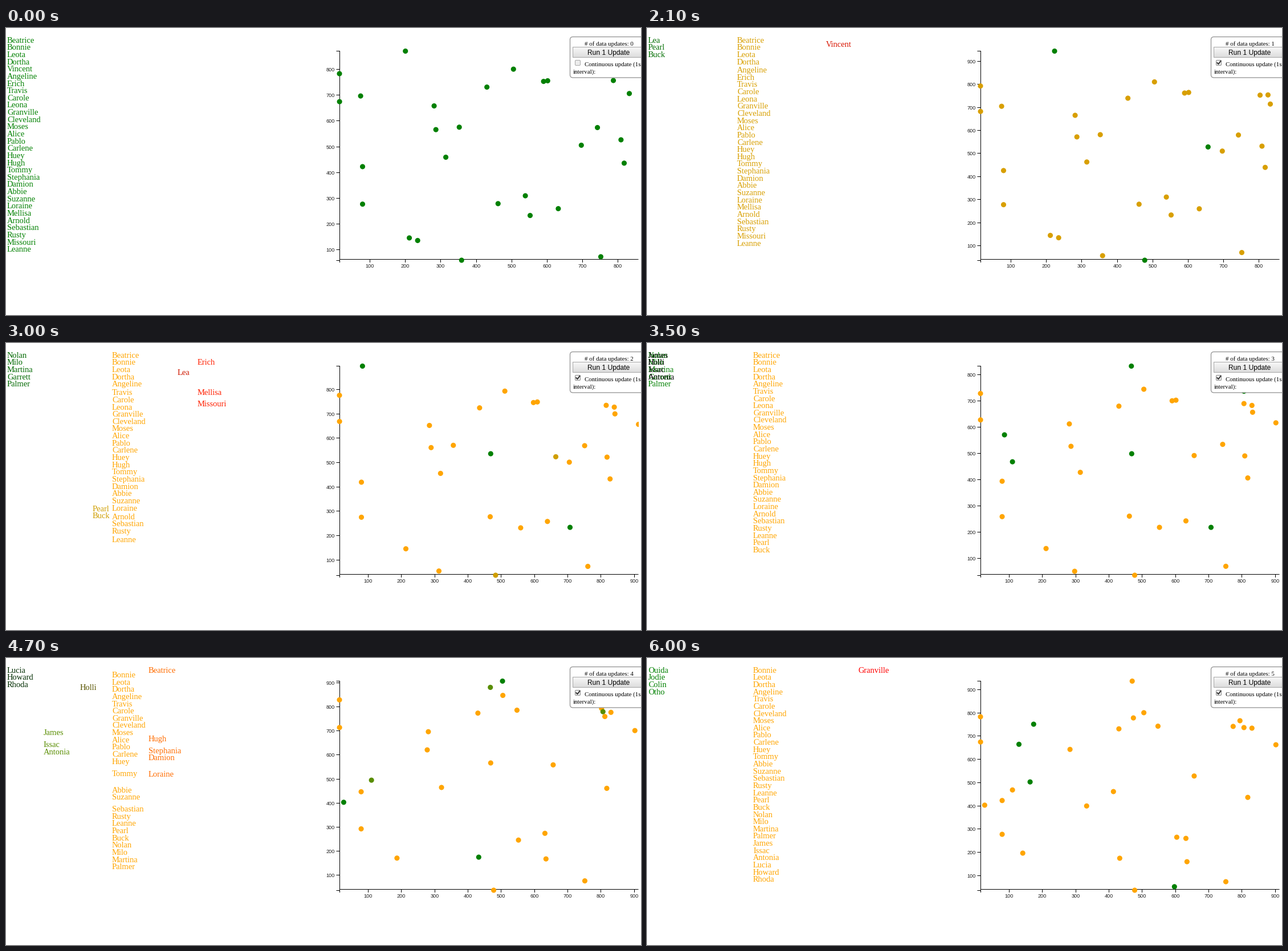
Recreate the animation shown at these times as a matplotlib script. Size 1114 by 503 pixels, loop 6300 ms.

```python
import math

import numpy as np
import matplotlib.pyplot as plt
from matplotlib.animation import FuncAnimation
from matplotlib.patches import FancyBboxPatch, Rectangle

W, H, DPI = 1114, 503, 100
PT = 72 / DPI
STEP_MS, LOOP_MS = 100, 6300
DURATION = 750
SERIF, SANS = "Liberation Serif", "Liberation Sans"

BLACK, GREEN = (0, 0, 0), (0, 128 / 255, 0)
ORANGE, RED = (1, 165 / 255, 0), (1, 0, 0)

LEFT, RIGHT, TOP, BOTTOM = 585, 1137, 40.5, 407
AXIS_X, AXIS_Y, SVG_RIGHT = 585.5, 405.5, 1109.5
TICK = 5.5
COLUMNS = {"enter": (2, GREEN), "update": (186, ORANGE), "exit": (370, RED)}
ROW_Y, ROW_STEP = 25.7, 12.64

INITIAL = {
    "Beatrice": (601.5, 756), "Bonnie": (13.8, 783.5), "Leota": (14, 675),
    "Dortha": (286, 566.5), "Vincent": (200, 871), "Angeline": (314, 459.5),
    "Erich": (73.5, 697), "Travis": (430, 731.5), "Carole": (505, 801),
    "Leona": (352, 576), "Granville": (281, 658.5), "Cleveland": (590, 753.5),
    "Moses": (787, 757), "Alice": (832, 706.5), "Pablo": (817.5, 436.5),
    "Carlene": (79, 423), "Huey": (79, 277.5), "Hugh": (742, 574.5),
    "Tommy": (552, 233.5), "Stephania": (808.5, 527), "Damion": (461.5, 279.5),
    "Abbie": (631.5, 260), "Suzanne": (211, 146.5), "Loraine": (358.5, 60),
    "Mellisa": (538.5, 310), "Arnold": (696.5, 506), "Sebastian": (751.5, 73.5),
    "Rusty": (800, 800), "Missouri": (234.5, 136.5), "Leanne": (902, 663),
}

# Each update: (new points, leaving names, changed points)
UPDATES = [
    (INITIAL, "", {}),
    ({"Lea": (223, 944.5), "Pearl": (656.3, 528.5), "Buck": (477.5, 36.8)},
     "Vincent",
     {"Moses": (806, 742), "Rusty": (830, 734.5)}),
    ({"Nolan": (468.5, 536), "Milo": (707, 233.5), "Martina": (959.8, 500),
      "Garrett": (83, 896), "Palmer": (950, 600)},
     "Erich Mellisa Missouri Lea",
     {"Loraine": (297, 53)}),
    ({"James": (467.5, 832.5), "Holli": (86, 571), "Issac": (110, 468.5),
      "Antonia": (806, 737)},
     "Leona Arnold Garrett",
     {"Cleveland": (547.5, 743), "Milo": (634.7, 159.6)}),
    ({"Lucia": (504, 907.5), "Howard": (26.5, 403), "Rhoda": (432.5, 174.5)},
     "Beatrice Hugh Stephania Damion Loraine Holli",
     {"Dortha": (262, 630), "Angeline": (333, 399.5), "Moses": (794, 766.5),
      "Alice": (773.5, 742), "Suzanne": (141, 196.5)}),
    ({"Ouida": (173.7, 751.5), "Jodie": (129.5, 665), "Colin": (163, 503),
      "Otho": (597, 52)},
     "Granville",
     {"Dortha": (283, 643), "Tommy": (604, 265), "Nolan": (413.6, 461.5),
      "James": (473.6, 778.5), "Lucia": (470, 937)}),
]
SHOWN_AT = [0, 1700, 2600, 3500, 4500, 5300]


class Scale:
    def __init__(self, values, start, end):
        self.low, self.high = min(values), max(values)
        self.start, self.end = start, end

    def __call__(self, v):
        part = (v - self.low) / (self.high - self.low)
        return self.start + part * (self.end - self.start)

    def ticks(self):
        return range(math.ceil(self.low / 100) * 100, int(self.high) + 1, 100)


def build_stages():
    data, stages = {}, []
    for entering, leaving, moves in UPDATES:
        leaving = leaving.split()
        groups = {"update": [n for n in data if n not in leaving],
                  "exit": [n for n in data if n in leaving],
                  "enter": list(entering)}
        for name in leaving:
            del data[name]
        data.update(moves)
        data.update(entering)
        labels = {}
        for group, names in groups.items():
            x, color = COLUMNS[group]
            for i, name in enumerate(names):
                labels[name] = (group, np.array([x, ROW_Y + i * ROW_STEP]),
                                np.array(color))
        sx = Scale([p[0] for p in data.values()], LEFT, RIGHT)
        sy = Scale([p[1] for p in data.values()], BOTTOM, TOP)
        dots = {n: np.array([sx(x), sy(y)]) for n, (x, y) in data.items()}
        stages.append((labels, dots, sx, sy))
    return stages


STAGES = build_stages()

fig = plt.figure(figsize=(W / DPI, H / DPI), dpi=DPI, facecolor="white")
ax = fig.add_axes([0, 0, 1, 1])
ax.axis("off")
live = []


def write(x, y, text, px, font=SERIF, **kw):
    return ax.text(x, y, text, fontsize=px * PT, family=font, **kw)


def draw_panel():
    ax.add_patch(FancyBboxPatch((989.5, 15.5), 150, 71.5, fc="white", ec="#8c8c8c",
                                boxstyle="round,pad=0,rounding_size=5",
                                lw=1.2 * PT, zorder=10))
    shade = np.linspace(0.97, 0.86, 32).reshape(-1, 1)
    ax.imshow(shade, cmap="gray", vmin=0, vmax=1, aspect="auto",
              extent=(994, 1130, 52, 33), zorder=11)
    ax.add_patch(Rectangle((994.5, 33.5), 140, 18, fill=False, ec="#a6a6a6",
                           lw=PT, snap=False, zorder=12))
    write(1057, 47, "Run 1 Update", 12, SANS, ha="center", zorder=13)
    write(1015, 67, "Continuous update (1s", 10.85, zorder=13)
    write(995, 79.5, "interval):", 10.85, zorder=13)


def draw_checkbox(t):
    fill = "#c8c8c8" if t == 700 else "#ececec"
    edge = "#a8a8a8" if t < 100 else "#8a8a8a"
    live.append(ax.add_patch(FancyBboxPatch(
        (998.5, 56.5), 9, 9, fc=fill, ec=edge, lw=PT, zorder=13,
        boxstyle="round,pad=0,rounding_size=1.5")))
    if t >= 800:
        live.extend(ax.plot([1000.3, 1002.4, 1006.4], [61, 63.3, 58], color="#333333",
                            lw=1.9 * PT, zorder=14))


def pixel_center(v):
    return math.floor(v) + .5


def draw_axes(sx, sy):
    top, bottom = pixel_center(TOP), pixel_center(BOTTOM)
    segments = [((AXIS_X, top), (AXIS_X, bottom)),
                ((LEFT, AXIS_Y), (SVG_RIGHT, AXIS_Y)),
                ((AXIS_X, AXIS_Y), (AXIS_X, AXIS_Y + TICK))]
    segments += [((AXIS_X - TICK - .5, y), (AXIS_X + .5, y)) for y in (top, bottom)]
    style = dict(color="#222222", clip_on=True, clip_path=svg_clip)
    for v in sy.ticks():
        y = pixel_center(sy(v))
        segments.append(((AXIS_X - TICK - .5, y), (AXIS_X, y)))
        live.append(write(576.8, y + 3.2, v, 9.1, SANS, ha="right", **style))
    for v in sx.ticks():
        x = pixel_center(sx(v))
        if x < SVG_RIGHT:
            segments.append(((x, AXIS_Y), (x, AXIS_Y + TICK)))
            live.append(write(x, 419.5, v, 9.1, SANS, ha="center", **style))
    for (x0, y0), (x1, y1) in segments:
        live.extend(ax.plot([x0, x1], [y0, y1], color="black", lw=PT, zorder=1,
                            solid_capstyle="butt", snap=False))


def ease(t):
    return 4 * t ** 3 if t < .5 else 1 - 4 * (1 - t) ** 3


def draw(i):
    while live:
        live.pop().remove()
    t = min(i * STEP_MS, 6000)
    k = max(n for n, start in enumerate(SHOWN_AT) if t >= start)
    # Updates come once a second on a clock slightly faster than playback.
    elapsed = max(0, 62 + 1.09 * (t - 1700) - 1000 * (k - 1)) if k else DURATION
    f = ease(min(elapsed / DURATION, 1))
    labels, dots, sx, sy = STAGES[k]
    old_labels, old_dots = STAGES[k - 1][:2] if k else ({}, {})

    draw_axes(sx, sy)
    centers, colors = [], []
    for name, (group, pos, color) in labels.items():
        if group == "exit" and elapsed >= DURATION:
            continue
        _, pos0, color0 = old_labels.get(name, (None, pos, np.array(BLACK)))
        tint = color0 + f * (color - color0)
        x, y = pos0 + f * (pos - pos0)
        live.append(write(x, y, name, 14.5, color=tuple(tint), zorder=3))
        if name in dots:
            start = old_dots.get(name, dots[name])
            centers.append(start + f * (dots[name] - start))
            colors.append(GREEN if group == "enter" else tuple(tint))
    xs, ys = np.array(centers).T
    cloud = ax.scatter(xs, ys, s=(9.1 * PT) ** 2, c=colors, linewidths=0, zorder=4)
    cloud.set_clip_path(svg_clip)
    live.append(cloud)
    draw_checkbox(t)
    live.append(write(1057.5, 30.5, f"# of data updates: {k}", 10.85, ha="center",
                      zorder=13))
    return live


draw_panel()
ax.set(xlim=(0, W), ylim=(H, 0))
ax.set_autoscale_on(False)
svg_clip = Rectangle((0, 0), SVG_RIGHT + .5, H, transform=ax.transData)

anim = FuncAnimation(fig, draw, frames=LOOP_MS // STEP_MS, interval=STEP_MS,
                     init_func=lambda: [], repeat=True, repeat_delay=0)
plt.show()
```
